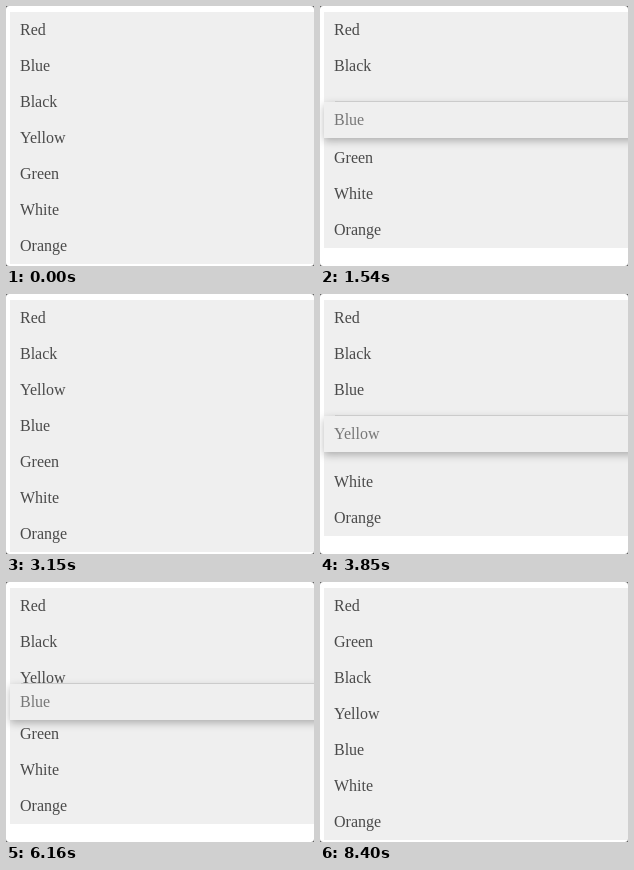
An HTML page with a canvas for the animation above (9030 ms loop, 308 by 260 pixels).

```html
<!DOCTYPE html>
<html lang="en">
<head>
<meta charset="utf-8">
<title>Sortable list</title>
<style>
  html, body { margin: 0; width: 100%; height: 100%; overflow: hidden; background: #fff; }
  canvas { display: block; }
</style>
</head>
<body>
<canvas id="stage" width="308" height="260"></canvas>
<script>
const ctx = document.getElementById('stage').getContext('2d');
const W = 308, H = 260, LOOP = 9030, TICK = 70;
const LEFT = 4, TOP = 6, ROW = 36, GAP = 20;
const START = ['Red', 'Blue', 'Black', 'Yellow', 'Green', 'White', 'Orange'];

// path: [time, row centre] points, eased between; the row is released at drop
const DRAGS = [
  { name: 'Blue',   slot: 3, drop: 2240, path: [[980, 60], [1820, 133]] },
  { name: 'Yellow', slot: 3, drop: 4830, path: [[3220, 96], [4060, 148], [4760, 134]] },
  { name: 'Blue',   slot: 4, drop: 6860, path: [[5740, 96], [6790, 164]] },
  { name: 'Green',  slot: 1, drop: 8400, path: [[7560, 132], [8120, 56]] }
];

const smooth = p => p * p * (3 - 2 * p);
const without = (list, name) => list.filter(item => item !== name);

function insert(list, name, slot) {
  const rest = without(list, name);
  rest.splice(slot, 0, name);
  return rest;
}

function along(path, t) {
  for (let i = 1; i < path.length; i++) {
    const [t0, y0] = path[i - 1], [t1, y1] = path[i];
    if (t < t1) return Math.round(y0 + (y1 - y0) * smooth((t - t0) / (t1 - t0)));
  }
  return path[path.length - 1][1];
}

function label(text, centre, color) {
  ctx.fillStyle = color;
  ctx.fillText(text, 14, centre + 5);
}

function panel(height) {
  ctx.fillStyle = '#efefef';
  ctx.fillRect(LEFT, TOP, W - LEFT, height);
}

function drawRows(list, gapAt) {
  const hasGap = gapAt < list.length || list.length < START.length;
  panel(list.length * ROW + (hasGap ? GAP : 0));
  list.forEach((name, i) => {
    label(name, TOP + ROW * (i + 0.5) + (i >= gapAt ? GAP : 0), '#4a4a4a');
  });
}

function drawLifted(name, centre) {
  const top = centre - ROW / 2;
  ctx.save();
  ctx.shadowColor = 'rgba(0,0,0,0.28)';
  ctx.shadowBlur = 8;
  ctx.shadowOffsetY = 3;
  ctx.fillStyle = '#efefef';
  ctx.fillRect(LEFT, top, W + 20, ROW);
  ctx.restore();
  ctx.fillStyle = 'rgba(0,0,0,0.1)';
  ctx.fillRect(15, top - 1, W, 1);
  label(name, centre, '#777');
}

function drawList(t) {
  let list = START;
  for (const drag of DRAGS) {
    if (t >= drag.drop) {
      list = insert(list, drag.name, drag.slot);
    } else if (t >= drag.path[0][0]) {
      const y = along(drag.path, t);
      const others = without(list, drag.name);
      // rows below the gap sit lower, so they swap later on the way down
      const first = TOP + ROW / 2 + (drag.path[1][1] > drag.path[0][1] ? GAP : 0);
      const gapAt = others.filter((_, i) => y > first + ROW * i).length;
      drawRows(others, gapAt);
      drawLifted(drag.name, y);
      return;
    }
  }
  drawRows(list, list.length);
}

function drawCorners() {
  ctx.beginPath();
  ctx.rect(0, 0, W, H);
  ctx.roundRect(0, 0, W, H, 3);
  ctx.fillStyle = '#555';
  ctx.fill('evenodd');
}

function frame(now) {
  const t = Math.floor((now % LOOP) / TICK) * TICK;
  ctx.fillStyle = '#fff';
  ctx.fillRect(0, 0, W, H);
  ctx.font = '16px "Liberation Serif", Times, serif';
  drawList(t);
  drawCorners();
  requestAnimationFrame(frame);
}

frame(0);
</script>
</body>
</html>
```
